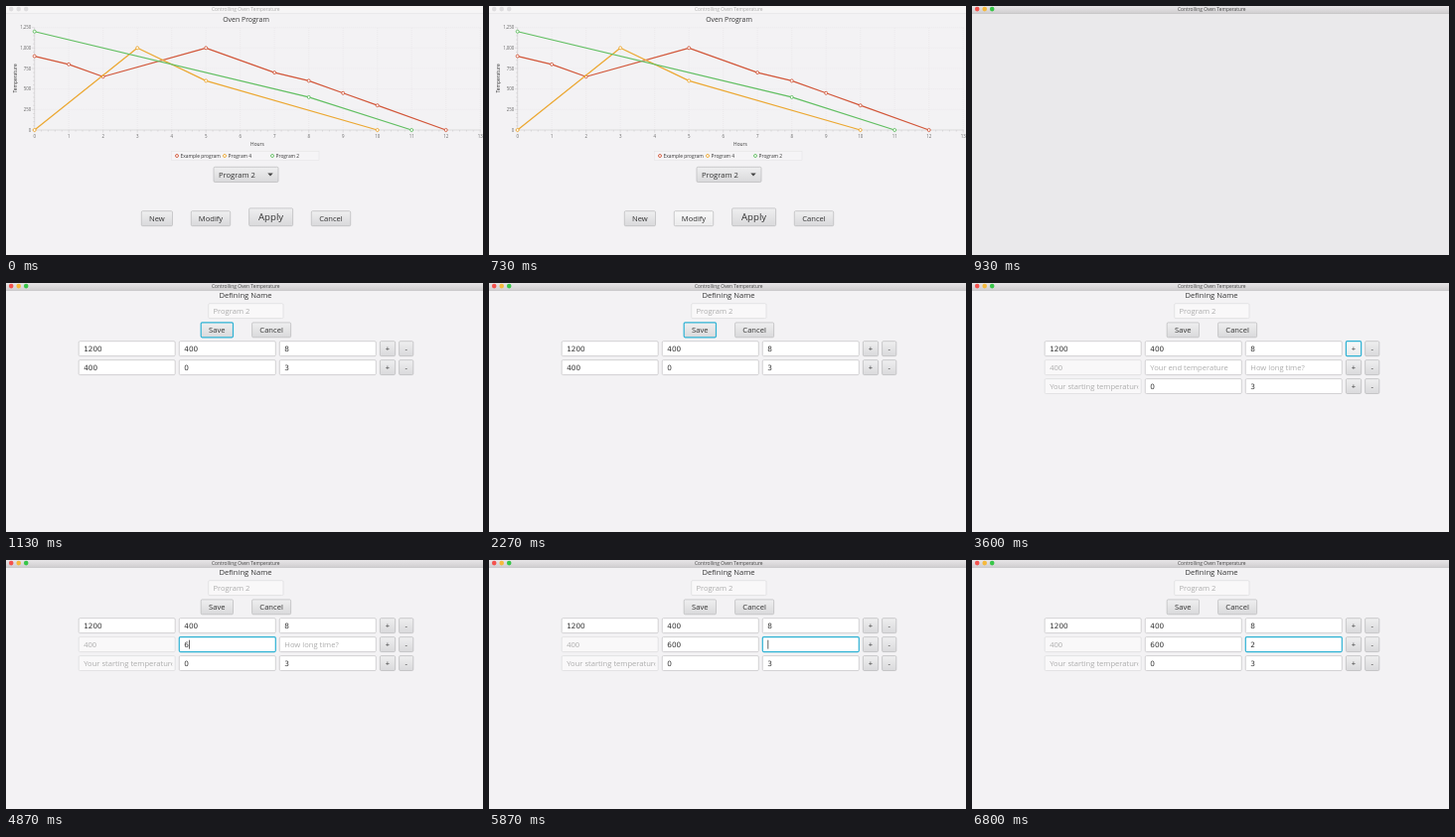
Recreate the animation shown at these times as an HTML page. Size 480 by 251 pixels, loop 6.99 s.

```html
<!DOCTYPE html>
<html lang="en">
<head>
<meta charset="utf-8">
<title>Controlling Oven Temperature</title>
<style>
  html, body { margin: 0; width: 100%; height: 100%; overflow: hidden; background: #f3f2f4; }
  svg { display: block; width: 100vw; height: 100vh; }
  text { font-family: "Open Sans", "Noto Sans", sans-serif; font-size: 7.6px; fill: #333; }
  .small { font-size: 4.87px; }
  .tick { font-size: 4.4px; fill: #666; }
  .mid { text-anchor: middle; }
  .end { text-anchor: end; }
  .digits { font-family: "DejaVu Sans", Verdana, sans-serif; font-size: 7.3px; }
  .prompt { fill: #acacac; }
</style>
</head>
<body>
<svg id="stage" viewBox="0 0 480 251" preserveAspectRatio="none">
  <defs>
    <linearGradient id="face" x2="0" y2="1"><stop stop-color="#efeff0"/><stop offset="1" stop-color="#d9d9db"/></linearGradient>
    <linearGradient id="hover" x2="0" y2="1"><stop stop-color="#f9f9f9"/><stop offset="1" stop-color="#ebebec"/></linearGradient>
    <linearGradient id="bar" x2="0" y2="1"><stop stop-color="#e8e6e8"/><stop offset="1" stop-color="#d0ced0"/></linearGradient>
    <clipPath id="firstField"><rect x="76" y="58" width="91.3" height="56"/></clipPath>
  </defs>
  <g id="chart"></g>
  <g id="editor">
    <rect id="backdrop" width="480" height="251"/>
    <g id="form"></g>
    <g id="editorBar"></g>
  </g>
</svg>
<script>
const LOOP = 6990;
const FOCUS = '#2fb2d4';
const $ = id => document.getElementById(id);

const label = (x, y, str, cls = '', extra = '') =>
  `<text x="${x}" y="${y}" class="${cls}" ${extra}>${str}</text>`;

const box = (x, y, w, h, fill, stroke, extra = '') =>
  `<rect x="${x}" y="${y}" width="${w}" height="${h}" rx="1.2" fill="${fill}" stroke="${stroke}" stroke-width=".7" ${extra}/>`;

const button = (id, x, y, w, h, str, style = '') =>
  box(x, y, w, h, 'url(#face)', '#b9b9bb', `id="${id}"`) +
  label(x + w / 2, y + h / 2 + 2.8, str, 'mid', style);

function titleBar(active) {
  const colors = active ? ['#f4524d', '#f6b93a', '#37c648'] : ['#dddcde', '#dddcde', '#dddcde'];
  return `<rect width="480" height="7.3" fill="${active ? 'url(#bar)' : '#f6f5f6'}"/>
    <rect y="7" width="480" height=".6" fill="${active ? '#b9b7b9' : '#e4e3e5'}"/>` +
    colors.map((c, i) => `<circle cx="${5.2 + 7.5 * i}" cy="3.1" r="2.3" fill="${c}"/>`).join('') +
    label(241.3, 4.9, 'Controlling Oven Temperature', 'small mid', `style="fill:${active ? '#444' : '#aaa'}"`);
}

// Chart view
const px = hour => 28.7 + 34.5 * hour;
const py = temp => 125 - temp * 0.0827;

const series = [
  { name: 'Example program', color: '#d2573a', legendX: 172,
    points: [[0, 900], [1, 800], [2, 650], [5, 1000], [7, 700], [8, 600], [9, 450], [10, 300], [12, 0]] },
  { name: 'Program 4', color: '#eca832', legendX: 220,
    points: [[0, 0], [3, 1000], [5, 600], [10, 0]] },
  { name: 'Program 2', color: '#62bf62', legendX: 268,
    points: [[0, 1200], [8, 400], [11, 0]] }
];

const dot = (x, y, color) =>
  `<circle cx="${x}" cy="${y}" r="1.5" fill="#fff" stroke="${color}" stroke-width=".9"/>`;

function axes() {
  let grid = '', ticks = '', labels = '';
  for (let h = 0; h <= 13; h++) {
    grid += `M${px(h)} 22V125`;
    labels += label(px(h), 133.3, h, 'tick mid');
    for (let k = 0; k < (h < 13 ? 5 : 1); k++) ticks += `M${px(h + k / 5)} 125v${k ? 1.6 : 2.6}`;
  }
  for (let t = 0; t <= 1250; t += 250) {
    grid += `M28.7 ${py(t)}H477.5`;
    labels += label(25.3, py(t) + 1.6, t.toLocaleString('en-US'), 'tick end');
    for (let k = 0; k < (t < 1250 ? 5 : 1); k++) ticks += `M28.7 ${py(t + k * 50)}h${k ? -1.6 : -2.6}`;
  }
  return `<path d="${grid}" stroke="#e0dfe1" stroke-width=".4" stroke-dasharray="1 1"/>
    <path d="${ticks}M28.7 22V125H477.5" stroke="#c6c5c7" stroke-width=".5" fill="none"/>` + labels;
}

const plot = ({ color, points }) => {
  const at = points.map(([h, t]) => [px(h), py(t)]);
  return `<polyline points="${at.join(' ')}" fill="none" stroke="${color}" stroke-width="1.25" stroke-linejoin="round"/>` +
    at.map(([x, y]) => dot(x, y, color)).join('');
};

$('chart').innerHTML = `<rect width="480" height="251" fill="#f3f2f4"/>` + titleBar(false) +
  label(241.5, 16, 'Oven Program', 'mid', 'style="font-size:6.95px"') +
  axes() + series.map(plot).join('') +
  label(0, 0, 'Temperature', 'small mid', 'transform="translate(11.3 73) rotate(-90)"') +
  label(253, 140.5, 'Hours', 'small mid') +
  `<rect x="166.5" y="146.3" width="148.5" height="9" fill="#f5f4f6" stroke="#e3e2e4" stroke-width=".5"/>` +
  series.map(s => dot(s.legendX, 151, s.color) + label(s.legendX + 3.6, 152.7, s.name, 'small')).join('') +
  box(209, 162.3, 65, 15.2, 'url(#face)', '#b9b9bb') +
  label(214, 172.6, 'Program 2') +
  `<path d="M263.3 168.6h5.4l-2.7 2.8z" fill="#444"/>` +
  button('new', 136.3, 206.7, 31.2, 15, 'New') +
  button('modify', 186.3, 206.7, 39.4, 15, 'Modify') +
  button('apply', 244.6, 203.9, 44, 17.8, 'Apply', 'style="font-size:9.6px"') +
  button('cancel', 307.3, 206.7, 39.4, 15, 'Cancel');

// Editor view
const COLS = [73.2, 174.3, 275.3];
const rowY = row => 58.7 + 18.95 * row;

const field = (row, col, disabled) =>
  box(COLS[col], rowY(row), 97, 14.9, disabled ? '#f9f8f9' : '#fff', disabled ? '#dcdbdd' : '#c3c2c4', `id="field${row}${col}"`);

const value = (id, row, col, cls = 'digits') =>
  label(COLS[col] + 5, rowY(row) + 10.1, '', cls, `id="${id}"`);

const rowOf = row => `<g id="row${row}">` +
  [0, 1, 2].map(col => field(row, col, row === 2 && col === 0)).join('') +
  `<g clip-path="url(#firstField)">${value(`value${row}0`, row, 0)}</g>` +
  value(`value${row}1`, row, 1) + value(`value${row}2`, row, 2) +
  button(`plus${row}`, 376.4, rowY(row), 15.2, 14.9, '+') +
  button(`minus${row}`, 395.6, rowY(row), 14.2, 14.9, '-') + '</g>';

$('form').innerHTML =
  label(241, 14.6, 'Defining Name', 'mid') +
  box(203.7, 20.7, 75.3, 14.9, '#f9f8f9', '#dcdbdd') +
  label(208.5, 31, 'Program 2', 'prompt') +
  button('save', 196.2, 39.9, 32.3, 14.9, 'Save') +
  button('cancelEdit', 247.6, 39.9, 39, 14.9, 'Cancel') +
  [0, 1, 2].map(rowOf).join('') +
  `<rect id="caret" y="${rowY(1) + 3}" width=".7" height="9" fill="#222"/>`;
$('editorBar').innerHTML = titleBar(true);

const show = (id, on) => { $(id).style.display = on ? '' : 'none'; };

function setValue(cell, str, prompt = false) {
  const node = $('value' + cell);
  node.textContent = str;
  const numeric = /^\d*$/.test(str);
  node.setAttribute('class', (numeric && !prompt ? 'digits' : '') + (prompt ? ' prompt' : ''));
}

function setFocus(id, on, plain = '#b9b9bb') {
  $(id).setAttribute('stroke', on ? FOCUS : plain);
  $(id).setAttribute('stroke-width', on ? 1.2 : 0.7);
}

// Interaction times in ms
const HOVER = 330, OPEN = 800, OPENED = 920, LOADED = 1060, ADD_PRESS = 2400, ADD_ROW = 2465;
const TEMP_FOCUS = 3700, TIME_FOCUS = 5865, TIME_TYPED = 6325;
const tempKeys = [[4795, '6'], [5060, '60'], [5260, '600']];

function render(t) {
  $('modify').setAttribute('fill', t >= HOVER ? 'url(#hover)' : 'url(#face)');
  show('chart', t < OPENED);
  show('editor', t >= OPEN);
  if (t < OPEN) return;

  const grow = Math.min(1, 0.4 + 0.6 * (t - OPEN) / (OPENED - OPEN));
  const scale = 0.9 + 0.1 * grow;
  $('editor').setAttribute('opacity', grow);
  $('editor').setAttribute('transform', `translate(${240 * (1 - scale)} ${125 * (1 - scale)}) scale(${scale})`);
  $('backdrop').setAttribute('fill', t < LOADED ? '#eae9eb' : '#f3f2f4');
  show('form', t >= LOADED);

  const added = t >= ADD_ROW;
  const onTemp = t >= TEMP_FOCUS && t < TIME_FOCUS;
  const onTime = t >= TIME_FOCUS;
  const typed = tempKeys.filter(([at]) => t >= at).pop() || [TEMP_FOCUS, ''];
  const time = t >= TIME_TYPED ? '2' : '';

  show('row2', added);
  setFocus('save', t < ADD_PRESS);
  const plusFocus = t >= ADD_PRESS && t < TEMP_FOCUS;
  setFocus('plus0', plusFocus);
  $('plus0').setAttribute('fill', plusFocus ? 'url(#hover)' : 'url(#face)');
  $('field10').setAttribute('fill', added ? '#f9f8f9' : '#fff');
  setFocus('field10', false, added ? '#dcdbdd' : '#c3c2c4');
  setFocus('field11', onTemp, '#c3c2c4');
  setFocus('field12', onTime, '#c3c2c4');

  setValue('10', '400', added);
  if (!added) {
    setValue('11', '0');
    setValue('12', '3');
  } else {
    const tempPrompt = !typed[1] && !onTemp;
    const timePrompt = !time && !onTime;
    setValue('11', tempPrompt ? 'Your end temperature' : typed[1], tempPrompt);
    setValue('12', timePrompt ? 'How long time?' : time, timePrompt);
  }

  const lastInput = onTime ? (time ? TIME_TYPED : TIME_FOCUS) : typed[0];
  const chars = onTime ? time.length : typed[1].length;
  show('caret', (onTemp || onTime) && (t - lastInput) % 940 < 470);
  $('caret').setAttribute('x', COLS[onTime ? 2 : 1] + 5.2 + 4.64 * chars);
}

['1200', '400', '8'].forEach((str, col) => setValue('0' + col, str));
setValue('20', 'Your starting temperature', true);
setValue('21', '0');
setValue('22', '3');

const start = performance.now();
function tick() {
  render((performance.now() - start) % LOOP);
  requestAnimationFrame(tick);
}
render(0);
requestAnimationFrame(tick);
</script>
</body>
</html>
```
